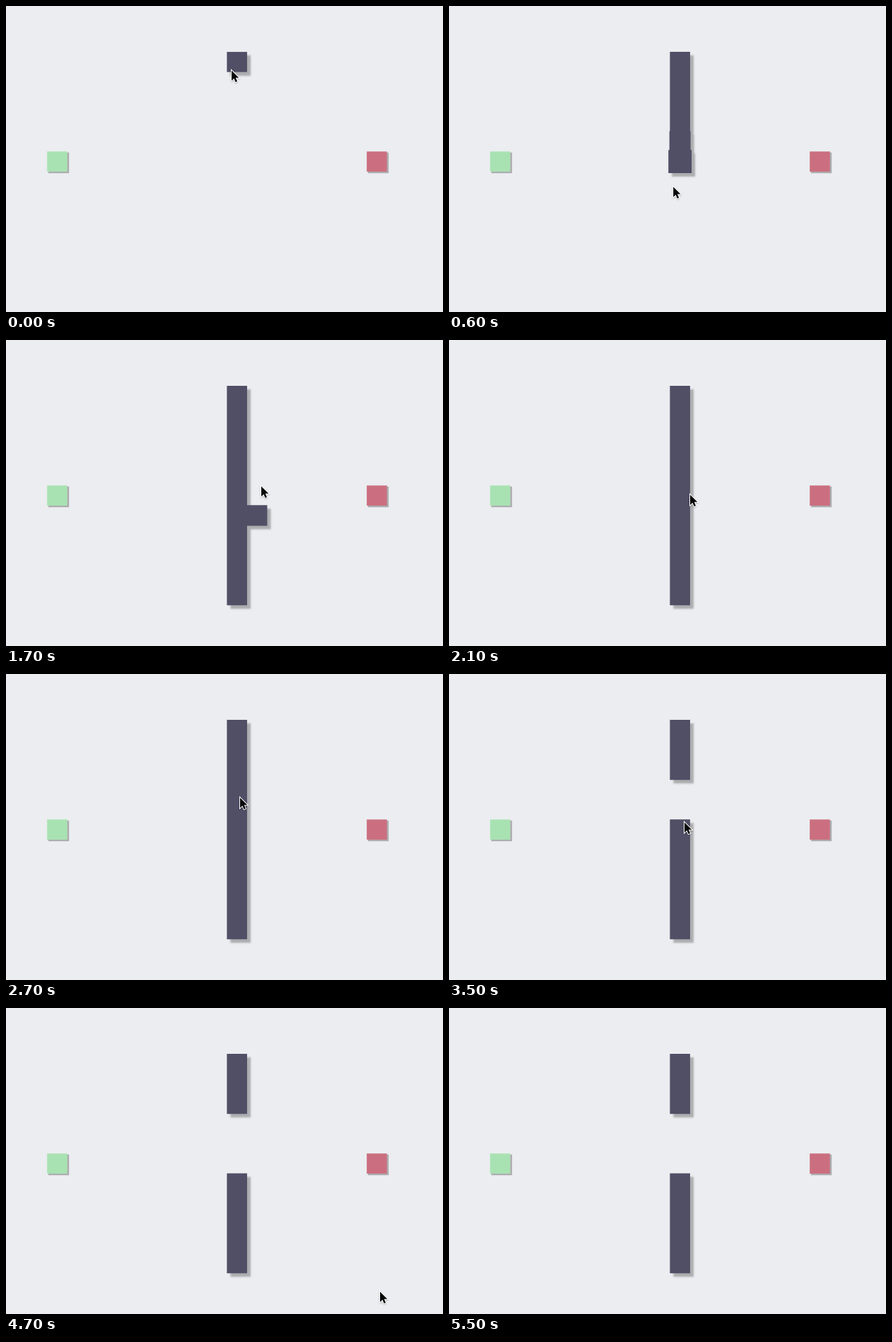
An HTML page with a canvas for the animation above (6400 ms loop, 618 px wide and 434 px high).

```html
<!DOCTYPE html>
<html lang="en">
<head>
<meta charset="utf-8">
<title>Drawing walls on a grid</title>
<style>
  html, body { margin: 0; width: 100%; height: 100%; overflow: hidden; background: #ebedf0; }
  canvas { display: block; }
</style>
</head>
<body>
<canvas id="stage" width="618" height="434"></canvas>
<script>
const ctx = document.getElementById('stage').getContext('2d');
const LOOP = 6400, STEP = 100, POP = 300;
const CELL = 28.25, LEFT = 312.4, TOP = 65.1, OVERLAP = .3;

// The column is drawn downwards at an even pace, then three clicks open a gap in it.
const clicks = [2900, 3200, 4450], gapRow = 3;
const walls = Array.from({ length: 11 }, (_, row) => ({
  col: 0, row,
  from: row ? row * 110 - 58 : -POP,
  to: clicks[row - gapRow] ?? Infinity
}));
walls.push({ col: 1, row: 6, from: 1625, to: 2100 });

// Key points of the pointer, with straight moves between them
const route = [
  { t: 0, x: 319, y: 91 },
  { t: 1000, x: 316, y: 366 },
  { t: 1500, x: 316, y: 366 },
  { t: 1700, x: 361, y: 207 },
  { t: 2200, x: 336, y: 222 },
  { t: 2700, x: 331, y: 175 },
  { t: 3500, x: 333, y: 210 },
  { t: 4400, x: 335, y: 229 },
  { t: 4700, x: 529, y: 402 }
];
const arrow = new Path2D('M0 0V14.4L3.4 11.2 5.7 16.4 8 15.4 5.8 10.3H10.3Z');

const mix = (a, b, k) => a + (b - a) * k;
const easeOut = k => 1 - (1 - k) ** 2.3;

function popScale(age) {
  const k = age / POP * 2;
  if (k >= 2) return 1;
  return k < 1 ? mix(.3, 1.2, easeOut(k)) : mix(1.2, 1, easeOut(k - 1));
}

function addCell(path, col, row, scale = 1) {
  const size = CELL * scale + OVERLAP, inset = CELL * (1 - scale) / 2;
  path.rect(LEFT + col * CELL + inset, TOP + row * CELL + inset, size, size);
}

function fillRaised(path, color, offset, blur) {
  ctx.save();
  ctx.fillStyle = color;
  ctx.shadowColor = '#adadb0';
  ctx.shadowOffsetX = ctx.shadowOffsetY = offset;
  ctx.shadowBlur = blur;
  ctx.fill(path);
  ctx.restore();
}

function drawMarker(col, row, color) {
  const path = new Path2D();
  addCell(path, col, row);
  fillRaised(path, color, 2, 1);
}

function drawWalls(t) {
  const path = new Path2D();
  for (const w of walls) {
    if (t >= w.from && t < w.to) addCell(path, w.col, w.row, popScale(t - w.from));
  }
  fillRaised(path, '#504f66', 5, 2.4);
}

function drawPointer(t) {
  const next = route.findIndex(p => p.t > t);
  const last = route.at(-1);
  if (t > last.t) return;
  const b = next < 0 ? last : route[next];
  const a = next < 0 ? last : route[next - 1];
  const k = a === b ? 0 : (t - a.t) / (b.t - a.t);
  ctx.save();
  ctx.translate(mix(a.x, b.x, k), mix(a.y, b.y, k) + .5);
  ctx.lineWidth = 2;
  ctx.strokeStyle = '#fff';
  ctx.shadowColor = 'rgba(0,0,0,.25)';
  ctx.shadowOffsetY = 1;
  ctx.shadowBlur = 2;
  ctx.stroke(arrow);
  ctx.shadowColor = 'transparent';
  ctx.fillStyle = '#050507';
  ctx.fill(arrow);
  ctx.restore();
}

function render(t) {
  ctx.fillStyle = '#ebedf0';
  ctx.fillRect(0, 0, 618, 434);
  drawMarker(-9, 5, '#a9e2b2');
  drawMarker(7, 5, '#cb6f80');
  drawWalls(t);
  drawPointer(t);
}

const start = performance.now();
function tick() {
  const t = (performance.now() - start) % LOOP;
  render(Math.floor(t / STEP) * STEP);
  requestAnimationFrame(tick);
}
tick();
</script>
</body>
</html>
```
